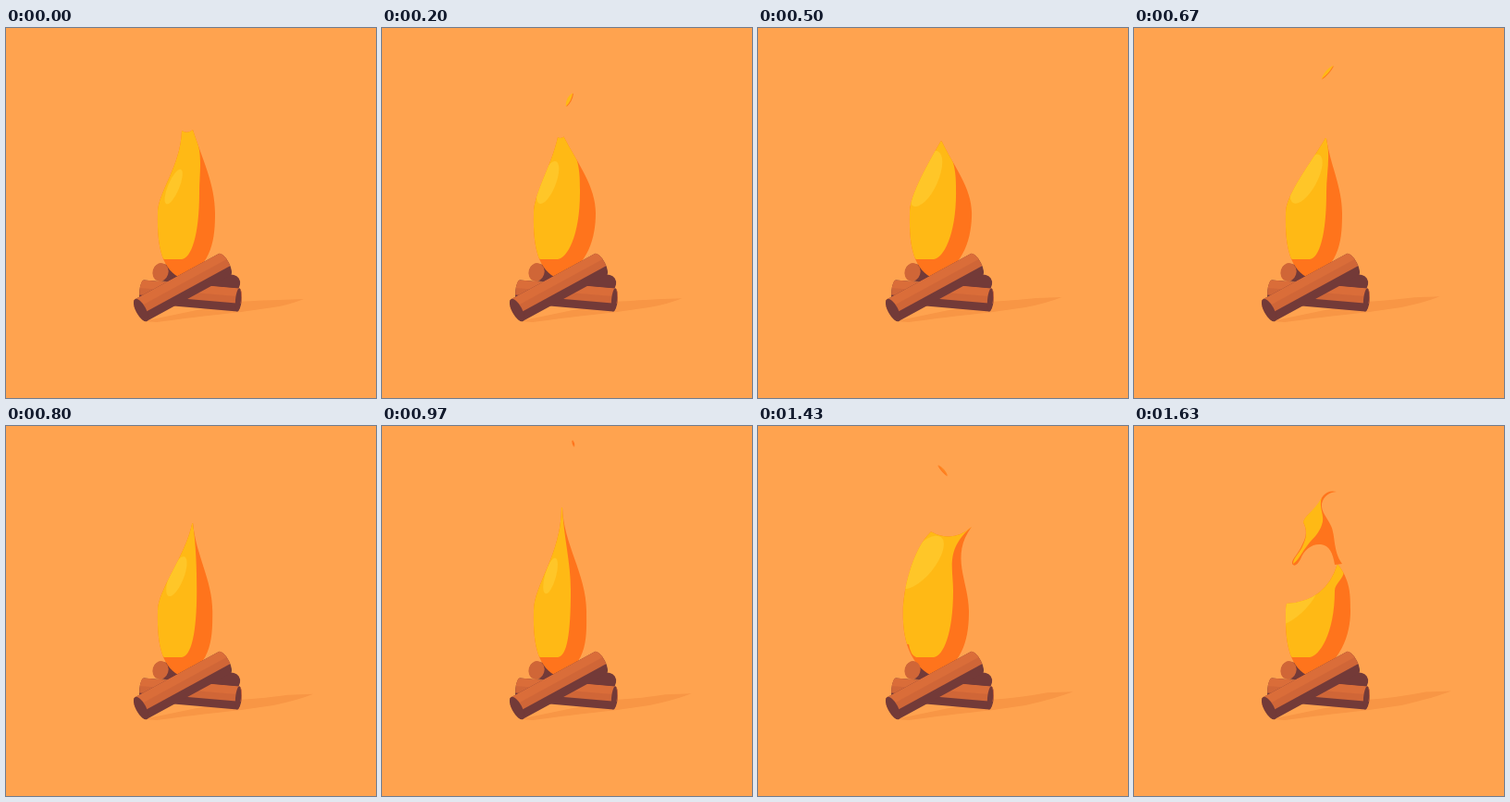
An HTML page with a canvas for the animation above (1.66 s loop, 400 by 400 pixels).

```html
<!DOCTYPE html>
<html lang="en">
<head>
<meta charset="utf-8">
<title>Campfire</title>
<style>
html, body { margin: 0; width: 100%; height: 100%; overflow: hidden; background: #ffa34f; }
canvas { display: block; width: 400px; height: 400px; }
</style>
</head>
<body>
<canvas id="stage"></canvas>
<script>
const canvas = document.getElementById('stage');
const ctx = canvas.getContext('2d');
const ratio = window.devicePixelRatio || 1;
canvas.width = canvas.height = 400 * ratio;

const LOOP = 1660, STEP = 1000 / 30;
const SKY = '#ffa34f', SHADE = '#f89645';
const ORANGE = '#ff741c', YELLOW = '#ffb915', GLOW = '#ffc628';
const BARK = '#733a38', WOOD = '#d06637', WOOD_TOP = '#da6d39';

// tip: top of the flame; horn: second peak, relative to the tip;
// belly: right side; curl: sideways bend below the tip; pinch: how slim the neck is.
const poses = [
  { at: 34, tip: [202, 110], horn: [-12, 1], belly: 226, curl: 10, pinch: 0.9 },
  { at: 366, tip: [191, 125], horn: [-1, 0], belly: 236, curl: 20, pinch: 0 },
  { at: 666, tip: [208, 119], horn: [-1, 0], belly: 225, curl: 4, pinch: 0.2 },
  { at: 966, tip: [195, 88], horn: [-1, 0], belly: 221, curl: 1, pinch: 1 },
  { at: 1266, tip: [194, 95], horn: [-4, 1], belly: 234, curl: 7, pinch: 0.6 },
  { at: 1433, tip: [231, 109], horn: [-44, 5], belly: 228, curl: -24, pinch: -0.5 },
  { at: 1633, tip: [220, 149], horn: [-55, 43], belly: 234, curl: 14, pinch: 0 }
];

// Every spark rises and shrinks the same way around the time it passes x, y.
const sparks = [
  { at: 230, x: 203, y: 70, len: 13, w: 4, turn: -1.1, color: YELLOW },
  { at: 666, x: 209, y: 48, len: 20, w: 4, turn: -0.85, color: YELLOW },
  { at: 966, x: 207, y: 19, len: 8, w: 2, turn: 1.3, color: ORANGE },
  { at: 1266, x: 192, y: 48, len: 20, w: 8, turn: -1.2, color: YELLOW },
  { at: 1433, x: 200, y: 48, len: 16, w: 3, turn: 0.85, color: '#ff8520' }
];

const plume = new Path2D('M219 71C208 68 202 77 200 84C195 92 185 96 183 104C187 112 187 119 182 128C178 138 170 144 171 149C174 153 177 149 180 144C184 133 193 127 202 128C211 129 215 137 217 150L225 149C215 135 218 119 213 108C209 99 202 93 203 84C205 76 210 72 219 71Z');
const plumeSide = new Path2D('M203 77C199 88 207 97 203 107C200 116 194 121 189 127C181 137 178 145 172 149C172 142 180 137 183 128C187 119 187 112 183 104C185 96 195 92 203 77Z');

const mix = (a, b, k) => Array.isArray(a) ? a.map((v, i) => mix(v, b[i], k)) : a + (b - a) * k;

function poseAt(t) {
  const i = Math.max(1, poses.findIndex(p => p.at >= t));
  const a = poses[i - 1], b = poses[i];
  const k = Math.max(0, (t - a.at) / (b.at - a.at));
  const pose = {};
  for (const key in a) pose[key] = mix(a[key], b[key], k);
  return pose;
}

function fill(color, path) {
  ctx.fillStyle = color;
  ctx.fill(path);
}

function oval(x, y, rx, ry, turn = 0) {
  const path = new Path2D();
  path.ellipse(x, y, rx, ry, turn, 0, Math.PI * 2);
  return path;
}

function drawShadow(t) {
  const x = 322 + t * 0.013, y = 293 - t * 0.004;
  const path = new Path2D();
  path.moveTo(148, 317);
  path.lineTo(250, 296);
  path.quadraticCurveTo(283, 294, x - 28, y + 1);
  path.lineTo(x, y);
  path.quadraticCurveTo(x - 18, y + 7, 289, 302);
  path.lineTo(254, 307);
  path.quadraticCurveTo(200, 313, 163, 318);
  path.closePath();
  fill(SHADE, path);
}

function drawFlame(t) {
  const { tip: [tx, ty], horn, belly, curl, pinch } = poseAt(t);
  const waist = 200;
  const left = 164 + Math.min(0, curl) * 0.3;
  const [dx, dy] = horn, hx = tx + dx, hy = ty + dy;
  const rise = waist - hy, drop = waist - ty;

  const body = new Path2D();
  body.moveTo(190, 271);
  body.bezierCurveTo(170, 262, left - 1, 240, left, waist);
  body.bezierCurveTo(left, waist - rise * 0.25,
    hx - (1 - pinch) * 0.45 * (hx - left), hy + rise * (0.3 + 0.15 * pinch), hx, hy);
  body.quadraticCurveTo(tx + dx / 2 + dy * 0.35, ty + dy / 2 - dx * 0.35, tx, ty);
  body.bezierCurveTo(tx + curl, ty + drop * 0.35, belly, waist - drop * 0.35, belly, waist);
  body.bezierCurveTo(belly, 225, 224, 258, 190, 271);

  const seam = belly - 17, fall = 178 - ty;
  const side = new Path2D();
  side.moveTo(tx, ty);
  side.bezierCurveTo(tx + curl * 1.2, ty + fall * 0.35, seam, 178 - fall * 0.35, seam, 178);
  side.bezierCurveTo(seam, 225, 200, 249, 190, 250);
  side.lineTo(171, 250);
  side.quadraticCurveTo(165, 248, 163, 236);
  side.lineTo(100, 230);
  side.lineTo(100, ty - 20);
  side.lineTo(tx - 3, ty - 20);

  const soft = (1 - Math.max(0, pinch)) ** 2;
  const gx = (left + hx - dx * 0.25) / 2 + 3 * pinch;
  const gy = (waist + hy - dy * 0.25) / 2 + 18 * pinch;

  fill(ORANGE, body);
  ctx.save();
  ctx.clip(body);
  fill(YELLOW, side);
  ctx.clip(side);
  fill(GLOW, oval(gx, gy, 6 + 9 * soft, 20 + 15 * soft, Math.atan2(tx - left, drop)));
  ctx.restore();
}

function drawPlume(t) {
  const s = Math.min(1, (t - 1433) / 200);
  if (s <= 0.25) return;
  ctx.save();
  ctx.translate(221, 149);
  ctx.scale(s, s);
  ctx.translate(-221, -149);
  fill(ORANGE, plume);
  fill(YELLOW, plumeSide);
  ctx.restore();
}

function drawSpark({ at, x, y, len, w, turn, color }, t) {
  const dt = t - at, s = Math.min(1.6, 1 - dt / 110);
  if (dt < -120 || s <= 0) return;
  const h = len / 2;
  const lens = new Path2D();
  lens.moveTo(-h, 0);
  lens.quadraticCurveTo(0, -w, h, 0);
  lens.quadraticCurveTo(0, w * 0.6, -h, 0);
  ctx.save();
  ctx.translate(x + dt * 0.02, y - dt * 0.25);
  ctx.rotate(turn);
  ctx.scale(s, s);
  ctx.save();
  ctx.translate(0, 0.8);
  fill(ORANGE, lens);
  ctx.restore();
  fill(color, lens);
  ctx.restore();
}

// A cylinder from a to b, lit from above; bulge flattens its round ends.
function drawLog([ax, ay], [bx, by], r, bulge, lit = true) {
  const len = Math.hypot(bx - ax, by - ay), e = r * bulge, q = Math.PI / 2;
  const trunk = new Path2D();
  trunk.ellipse(0, 0, e, r, 0, q, 3 * q);
  trunk.ellipse(len, 0, e, r, 0, -q, q);
  ctx.save();
  ctx.translate(ax, ay);
  ctx.rotate(Math.atan2(by - ay, bx - ax));
  fill(BARK, trunk);
  ctx.clip(trunk);
  if (lit) {
    ctx.fillStyle = WOOD;
    ctx.fillRect(-r, -r, len + 2 * r, r * 1.3);
    ctx.fillStyle = WOOD_TOP;
    ctx.fillRect(-r, -r, len + 2 * r, r * 0.7);
  }
  ctx.restore();
}

function drawScene(t) {
  ctx.fillStyle = SKY;
  ctx.fillRect(0, 0, 400, 400);
  drawShadow(t);
  drawLog([167, 264], [245, 276], 9, 0.9, false);
  drawFlame(t);
  drawPlume(t);
  sparks.forEach(p => drawSpark(p, t));

  drawLog([148, 285], [251, 294], 12.5, 0.3);
  fill(BARK, oval(251, 294, 3, 12.5, 0.09));
  fill(WOOD, oval(167, 264, 8.5, 10, 0.3));
  drawLog([146, 305], [236, 256], 13.5, 0.4);
  fill(BARK, oval(146, 305, 5.4, 13.5, -0.5));
}

const start = performance.now();
function tick() {
  // The motion advances in steps of a thirtieth of a second.
  const t = Math.floor(((performance.now() - start) % LOOP + 4) / STEP) * STEP;
  ctx.setTransform(ratio, 0, 0, ratio, 0, 0);
  drawScene(Math.min(t, poses[poses.length - 1].at));
  requestAnimationFrame(tick);
}
tick();
</script>
</body>
</html>
```
